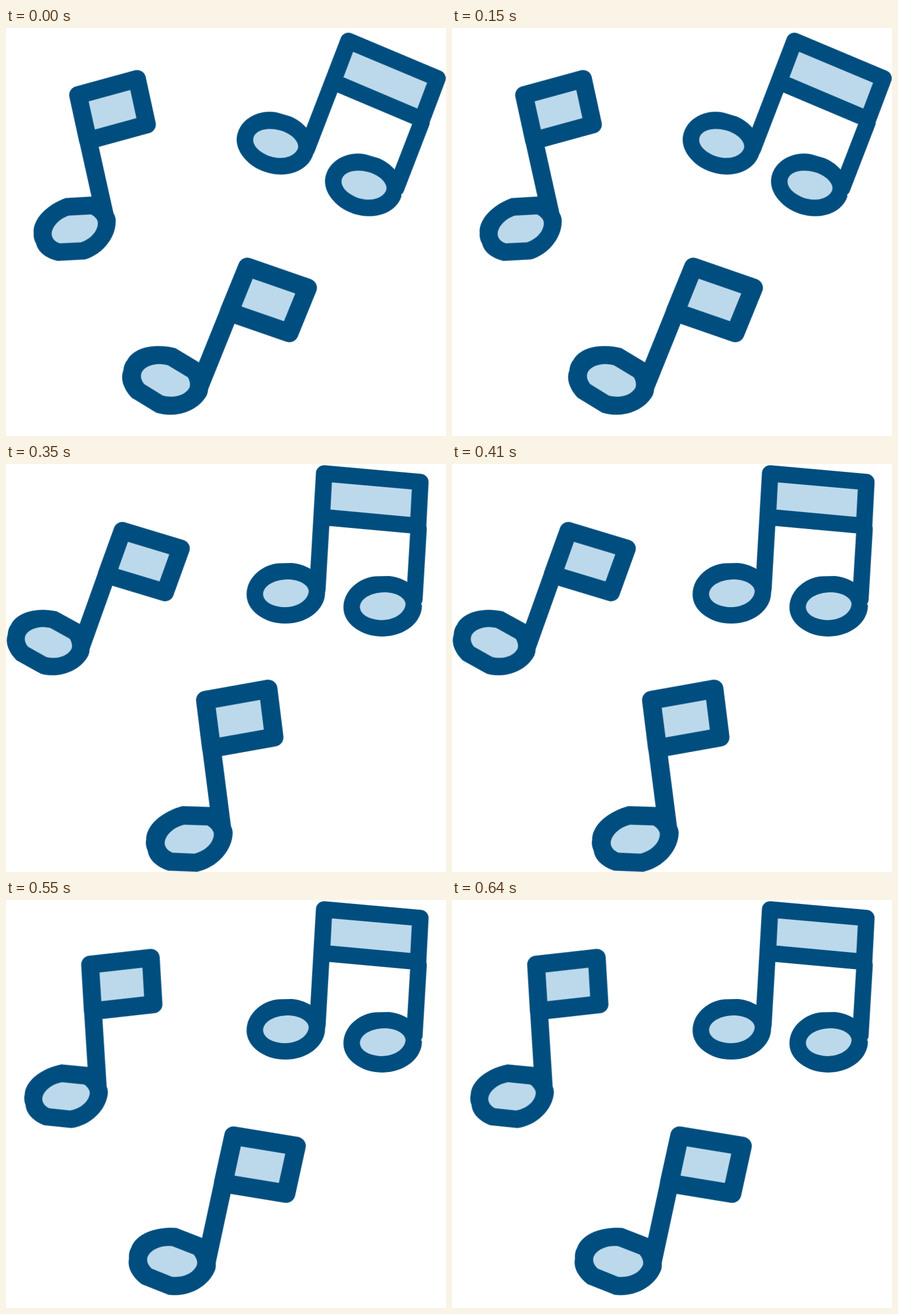
An HTML page for the animation above (700 ms loop, 777 by 721 pixels).

```html
<!DOCTYPE html>
<html lang="en">
<head>
<meta charset="utf-8">
<title>Dancing notes</title>
<style>
  html, body { margin: 0; width: 100%; height: 100%; overflow: hidden; background: #fff; }
  svg { display: block; width: 777px; height: 721px; }

  .ink { fill: #004e7f; }
  .pale { fill: #bcd9ec; }
  .line { fill: none; stroke: #004e7f; stroke-width: 31.5px; stroke-linejoin: round; stroke-linecap: round; }
  .pair .line { stroke-width: 29px; }

  /* Each note snaps between poses, turning about the centre of its flag. */
  .left, .low, .pair { animation: 700ms step-end infinite; }
  .left { animation-name: left; }
  .low { animation-name: low; }
  .pair { animation-name: pair; }

  @keyframes left {
    0%, 100% { transform: translate(188.1px, 144.5px) rotate(-8.94deg); }
    35.714%  { transform: translate(243.2px, 172.5px) rotate(23.2deg); }
    64.285%  { transform: translate(204.5px, 149.2px); }
  }
  @keyframes low {
    0%, 100% { transform: translate(463.2px, 480.6px) rotate(25.5deg) scale(1.044); }
    35.714%  { transform: translate(412.8px, 450.1px) rotate(-3.75deg) scale(1.044); }
    78.571%  { transform: translate(448.2px, 467.7px) rotate(15.7deg) scale(1.044); }
  }
  @keyframes pair {
    0%, 100% { transform: translate(669.7px, 92.1px) rotate(17.7deg); }
    50%      { transform: translate(644.7px, 62.9px); }
  }
</style>
</head>
<body>
<svg viewBox="0 0 777 721">
  <defs>
    <g id="note">
      <path class="pale" d="M-56-35.1 51.2-47.1 56 35.1-51.2 47.1Z"/>
      <path class="line" d="M-56-35.1 51.2-47.1 56 35.1-51.2 47.1ZL-42.5 180.8"/>
      <path class="ink" d="M-106.5 141.2L-60 145.7L-27.3 179Q-24.5 185-24.5 191
        C-26.5 221-54.5 249-89 253.8L-137.5 248.8C-158.5 240-169 227-170 212.8
        C-173 205-172.5 198-171.5 195C-170.5 169-140.5 148-106.5 141.2Z"/>
      <path class="pale" d="M-105.5 172.8L-66.5 176.8C-60.5 180.8-56.5 187-56.5 191.8
        C-57.5 207-73.5 219.8-91.5 222.8L-128.5 218.8C-137.5 214-140.5 208-140.5 201.8
        C-139.5 189-124.5 176-105.5 172.8Z"/>
    </g>
    <g id="head">
      <path class="ink" d="M-162.8 112.6L-139.8 112.1C-127.8 113-116.8 117-107.8 122.1
        L-81.3 164C-80.8 193-110.8 219.1-151.8 219.1C-189.8 219.1-219.8 195-219.8 169
        C-220.8 137-189.8 114-162.8 112.6Z"/>
      <path class="pale" d="M-148 141C-126 141-110.2 151-110.2 162.5
        C-111.8 178-130 190.1-152.8 190.1C-174.8 189.5-190.8 180-190.8 166.5
        C-190 152-171 141.5-148 141Z"/>
    </g>
  </defs>

  <g class="left"><use href="#note"/></g>
  <g class="low"><use href="#note"/></g>
  <g class="pair">
    <path class="pale" d="M-83-46.2 87-31.1 83 46.4-87 30.8Z"/>
    <path class="line" d="M-83-46.2 87-31.1 83 46.4-87 30.8ZL-94.8 158M83.8 52L76.5 176"/>
    <use href="#head"/>
    <use href="#head" x="171" y="22.8"/>
  </g>
</svg>
</body>
</html>
```
